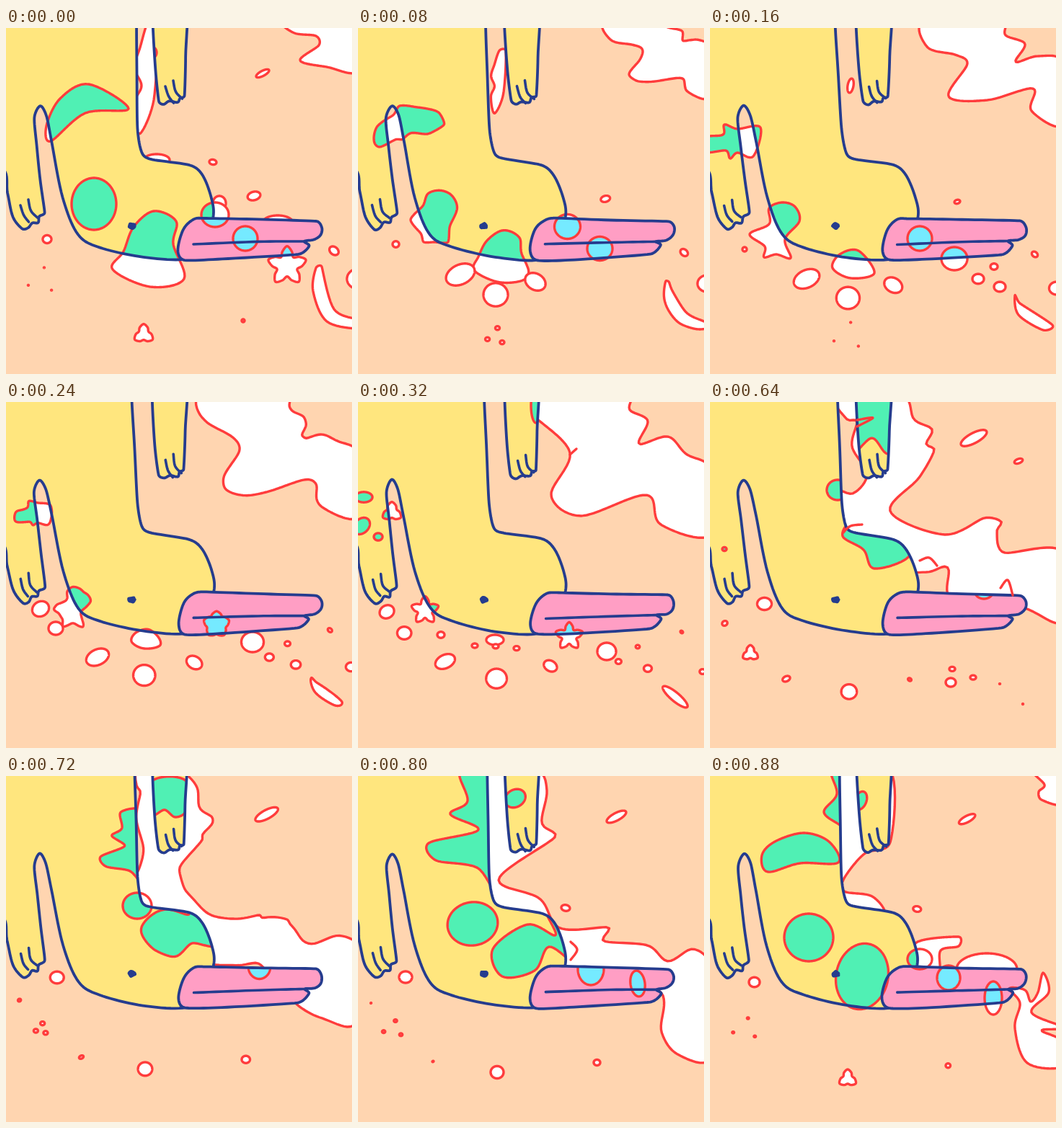
Animation, 480 px wide and 480 px high, one loop 960 ms. Source, as an HTML page with a canvas:

```html
<!DOCTYPE html>
<html lang="en">
<head>
<meta charset="utf-8">
<title>Splash</title>
<style>
html, body { margin: 0; width: 100%; height: 100%; overflow: hidden; background: #ffd5b0; }
canvas { display: block; width: 480px; height: 480px; }
</style>
</head>
<body>
<canvas id="stage" width="480" height="480"></canvas>
<script>
const ctx = document.getElementById('stage').getContext('2d');
const STEPS = 12, STEP_MS = 80, SAMPLES = 300, TURN = 2 * Math.PI;
const C = { sand: '#ffd5b0', skin: '#ffe67e', bill: '#ff9ec4', wet: '#50f0b4', wetBill: '#75eaff', ink: '#253c8e', red: '#ff3c3c' };

const pairs = a => Array.from({ length: a.length / 2 }, (_, i) => [a[2 * i], a[2 * i + 1]]);
const gap = (a, b) => Math.hypot(a[0] - b[0], a[1] - b[1]);
const mix = (a, b, f) => a + (b - a) * f;

// ---- Shapes: every one returns a list of points ----
const shape = (...a) => pairs(a);

function oval(x, y, rx, ry = rx, deg = 0) {
  const r = deg * TURN / 360, cos = Math.cos(r), sin = Math.sin(r);
  return Array.from({ length: 14 }, (_, i) => {
    const u = rx * Math.cos(i * TURN / 14), v = ry * Math.sin(i * TURN / 14);
    return [x + u * cos - v * sin, y + u * sin + v * cos];
  });
}

// Splat with n arms, the first one pointing up
function star(x, y, r, n, depth = .3) {
  return Array.from({ length: n * 4 }, (_, i) => {
    const a = i * TURN / (n * 4), d = r * (1 + depth * Math.cos(n * a));
    return [x + d * Math.sin(a), y - d * Math.cos(a)];
  });
}

// ---- Tracks: poses by step; steps past 11 carry on into the next round ----

// Flying drop: drag slows it sideways while it falls evenly and shrinks
function drop(t0, t1, [x0, y0, r0], [x1, y1, r1], flat = .85, tilt = 0) {
  const track = {};
  for (let t = t0; t <= t1; t++) {
    const f = (t - t0) / (t1 - t0), r = mix(r0, r1, f);
    track[t] = oval(mix(x0, x1, 1 - (1 - f) ** 2), mix(y0, y1, f), r, r * flat, tilt);
  }
  return track;
}

// A splat breaks into three specks that drift apart
function burst(t0, t1, x, y, r0, r1) {
  return [0, 1, 2].map(k => {
    const a = (.45 + k / 3) * TURN, at = (r, size) => [x + r * Math.cos(a), y + r * Math.sin(a), size];
    return drop(t0, t1, at(r0, 3), at(r1, .5));
  });
}

// Fine spray travelling along under the bill
const spray = Array.from({ length: 8 }, (_, i) =>
  ({ [4 + 2 * Math.floor(i / 3)]: oval(162 + i * 29, 338 + i * i * .9, 4, 3) }));

// Liquid behind the bird
const wave = {
  11: shape(448,-8, 464,12, 456,22, 460,33, 490,38, 490,-8),
  12: shape(385,-8, 400,7, 430,11, 434,24, 408,45, 445,54, 490,59, 490,-8),
  14: shape(296,-8, 302,27, 340,37, 357,50, 331,95, 385,100, 448,84, 446,115, 490,134, 490,48, 455,39, 424,47, 437,22, 410,10, 408,-8),
  16: shape(243,-8, 243,18, 294,70, 268,130, 310,158, 400,129, 420,170, 490,184, 490,94, 455,72, 430,48, 390,58, 402,26, 377,11, 377,-8),
  18: shape(195,-8, 230,40, 230,80, 252,88, 220,130, 218,185, 260,213, 365,186, 395,225, 490,236, 490,155, 466,130, 430,132, 390,107, 318,133, 382,36, 326,34, 338,-8),
  20: shape(176,-8, 190,24, 204,27, 197,62, 218,100, 198,127, 168,122, 220,225, 300,236, 330,230, 336,275, 430,284, 490,304, 490,208, 408,209, 398,180, 404,166, 380,161, 325,184, 250,152, 290,105, 311,67, 300,58, 308,38, 283,24, 268,-8),
  22: shape(176,-8, 172,160, 270,275, 415,296, 421,355, 445,387, 490,390, 490,265, 465,240, 430,257, 402,235, 341,229, 347,210, 280,211, 252,170, 195,143, 273,85, 255,65, 262,20, 248,-8)
};
const back = [
  wave,
  { 11: shape(178,-8, 176,160, 190,190, 241,192, 225,167, 186,160, 186,142, 214,108, 250,92, 250,-8),
    12: shape(197,-8, 186,27, 178,55, 188,80, 178,105, 185,147, 205,100, 212,-8),
    14: oval(195, 80, 4, 10, 10) },
  { 11: shape(285,232, 345,223, 345,236, 320,242, 318,270, 300,270), 12: oval(296, 243, 9, 10) },
  { 11: oval(384, 268, 42, 22), 12: oval(377, 270, 21, 10) },
  { 12: oval(209, 183, 18, 8) }
];

// Liquid only on the body and bill
const skin = [
  { 8: oval(177, 122, 15, 14),
    10: shape(142,-8, 152,35, 128,53, 167,75, 98,93, 108,117, 165,127, 196,160, 196,-8),
    11: shape(168,-8, 176,25, 158,50, 180,68, 196,80, 196,-8) },
  { 8: shape(200,165, 184,186, 213,205, 228,231, 277,213, 270,170),
    10: shape(262,188, 274,221, 235,206, 187,240, 200,278, 245,270, 265,237, 302,258, 304,215) },
  { 8: oval(380, 264, 12, 9), 10: oval(323, 268, 18, 22) }
];

// Liquid only on the right leg
const legWet = [
  { 4: oval(247, 5, 7, 24),
    6: shape(195,-8, 198,9, 237,11, 223,30, 270,35, 270,-8),
    8: shape(195,-8, 198,66, 225,50, 246,72, 270,60, 270,-8),
    10: oval(218, 31, 15, 12, -30), 11: oval(209, 34, 8, 13, 20), 12: oval(204, 34, 5, 7) }
];

// Drops that cross everything
const drops = [
  { 11: shape(72,110, 90,91, 130,79, 165,91, 178,120, 125,121, 80,133),
    12: shape(56,136, 75,98, 115,78, 170,112, 110,118, 62,157),
    14: shape(-8,152, 18,148, 20,134, 38,140, 70,138, 60,178, 38,173, 28,181, 22,170, -8,172),
    16: star(47, 153, 11, 3), 18: oval(43, 149, 4, 7) },
  { 9: oval(182, 180, 20, 18), 10: oval(159, 205, 35, 30, -10), 11: oval(137, 224, 34, 33), 12: oval(122, 244, 31, 36),
    14: shape(82,250, 100,242, 118,248, 124,268, 104,293, 112,319, 92,314, 75,318, 76,303, 55,286, 82,272),
    16: star(93, 289, 15, 5), 18: oval(85, 281, 11, 9), 22: oval(66, 279, 9, 8), 26: oval(48, 307, 3) },
  { 11: oval(211, 278, 36, 46, 12),
    12: shape(177,276, 205,254, 236,268, 232,300, 247,348, 200,359, 148,335, 163,310),
    14: shape(180,314, 206,309, 228,340, 195,347, 170,333),
    16: oval(190, 330, 12, 7), 18: oval(191, 342, 3) },
  { 11: oval(291, 254, 17, 14), 12: oval(290, 259, 19, 17), 14: oval(291, 292, 17),
    16: star(293, 325, 15, 5), 18: oval(292, 326, 7, 5) },
  { 11: oval(331, 280, 16, 17), 12: oval(332, 292, 17), 14: oval(339, 320, 18, 16), 16: oval(345, 346, 13, 12),
    18: star(347, 374, 13, 3, .1), 20: oval(334, 389, 7, 6), 24: oval(329, 406, 2) },
  { 10: oval(388, 288, 10, 18, -8), 11: oval(393, 308, 12, 23), 12: star(390, 330, 21, 5) },
  { 11: shape(415,295, 437,297, 445,313, 455,300, 462,273, 470,300, 446,328, 490,349, 460,353, 490,369, 490,403, 440,398, 423,350, 430,315),
    12: shape(430,333, 438,331, 455,390, 490,405, 490,417, 445,407, 426,365),
    14: shape(423,371, 430,382, 475,412, 462,419, 428,398), 16: oval(440, 409, 22, 6, 40), 20: oval(434, 419, .5) },
  drop(13, 22, [191, 370, 17], [193, 411, 9], .95),
  { 23: star(191, 420, 10, 3), 24: star(191, 425, 11, 3) },
  drop(13, 22, [142, 342, 21], [104, 396, 1], .65, -25),
  drop(13, 20, [246, 352, 15], [277, 385, 2.5], .75, 30),
  drop(14, 20, [402, 359, 8], [402, 391, .5]),
  drop(14, 18, [394, 331, 5], [386, 348, .5]),
  drop(14, 17, [372, 348, 8], [360, 366, 2]),
  drop(12, 16, [490, 348, 17], [478, 374, 4]),
  drop(12, 14, [344, 233, 9], [343, 241, 4], .65, -15),
  drop(12, 16, [455, 309, 7], [449, 319, 2], .75, 40),
  drop(10, 12, [288, 183, 6], [287, 186, 5], .7, 10),
  drop(8, 12, [366, 50, 20], [356, 63, 10], .35, -28),
  drop(6, 8, [430, 76, 10], [428, 82, 6], .5, -20),
  drop(4, 6, [8, 132, 12], [0, 132, 5], .6),
  drop(4, 6, [5, 172, 13], [0, 183, 5], .75, -45),
  drop(4, 8, [28, 187, 6], [20, 204, 3]),
  drop(3, 10, [48, 287, 12], [18, 315, .5], .85, -30),
  drop(3, 7, [69, 314, 10], [58, 340, 9], .9),
  { 8: star(56, 349, 9, 3) },
  drop(4, 6, [115, 323, 5], [118, 330, 3.5]),
  ...burst(9, 12, 49, 351, 8, 19),
  ...burst(13, 14, 191, 428, 12, 20),
  ...spray
];

// Loose red strokes by step
const curls = {
  4: [shape(294,73, 303,65)],
  6: [shape(262,181, 248,180, 240,187, 248,194, 260,195)],
  8: [shape(291,220, 304,216, 315,227), shape(403,258, 413,247, 420,268), shape(211,170, 195,172, 185,181), shape(204,34, 226,22, 204,25)],
  10: [shape(295,230, 304,241, 295,255)]
};

// ---- The bird ----
const body = shape(-60,-60, -60,190, -6,195, 2,228, 10,262, 23,279, 31,277, 36,270, 44,270, 46,262, 54,256, 48,210,
  43,165, 39,125, 47,108, 56,122, 64,160, 79,235, 100,286, 130,304, 190,318, 250,321, 275,300, 288,262, 285,235, 272,204,
  254,190, 203,182, 189,174, 183,140, 182,60, 181,-8, 181,-60);
const bill = shape(275,264, 350,266, 430,268, 438,276, 437,287, 428,294, 414,296, 420,302, 405,314, 300,321, 248,322, 239,308, 246,280, 260,266);
const leg = shape(203,-60, 203,-8, 207,60, 212,101, 219,106, 227,102, 238,103, 241,97, 247,94, 249,40, 249,-60);
const toes = (x, y) => [shape(x,y, x + 4,y + 14, x + 11,y + 23), shape(x + 11,y - 8, x + 14,y + 8, x + 23,y + 17)];
const billLine = [shape(260,300, 350,297, 416,296)];
const eye = oval(174.5, 274.5, 6, 5);

// ---- Geometry ----

// Cubic spline with tangents limited by the shorter neighbouring span
function smooth(pts, closed = true) {
  const n = pts.length, at = i => closed ? pts[(i + n) % n] : pts[Math.max(0, Math.min(n - 1, i))];
  const slope = i => {
    const p = at(i - 1), q = at(i), r = at(i + 1), len = gap(p, r) / 2 || 1;
    const k = Math.min(1, 1.2 * Math.min(gap(p, q) || 99, gap(q, r) || 99) / len) / 2;
    return [(r[0] - p[0]) * k, (r[1] - p[1]) * k];
  };
  const out = [];
  for (let i = 0; i < (closed ? n : n - 1); i++) {
    const a = at(i), b = at(i + 1), ma = slope(i), mb = slope(i + 1);
    for (let t = 0; t < .99; t += .1) {
      const s = t * t * (3 - 2 * t), u = t * (1 - t) ** 2, v = t * t * (t - 1);
      out.push([0, 1].map(d => mix(a[d], b[d], s) + ma[d] * u + mb[d] * v));
    }
  }
  if (!closed) out.push(pts[n - 1]);
  return out;
}

// Evenly spaced points, always in the same turning direction
function outline(shapePts) {
  let pts = smooth(shapePts);
  const n = pts.length, next = i => pts[(i + 1) % n];
  const area = pts.reduce((s, p, i) => s + p[0] * next(i)[1] - next(i)[0] * p[1], 0);
  if (area < 0) pts = pts.reverse();
  const sum = [0];
  for (let i = 0; i < n; i++) sum.push(sum[i] + gap(pts[i], next(i)));
  let k = 0;
  return Array.from({ length: SAMPLES }, (_, i) => {
    const d = sum[n] * i / SAMPLES;
    while (sum[k + 1] <= d) k++;
    const f = (d - sum[k]) / (sum[k + 1] - sum[k]), a = pts[k], b = next(k);
    return [mix(a[0], b[0], f), mix(a[1], b[1], f)];
  });
}

// Turn b's starting point so that it lies closest to a
function align(a, b) {
  let best = -Infinity, shift = 0;
  for (let k = 0; k < SAMPLES; k += 2) {
    let dot = 0;
    for (let i = 0; i < SAMPLES; i += 3) {
      const q = b[(i + k) % SAMPLES];
      dot += a[i][0] * q[0] + a[i][1] * q[1];
    }
    if (dot > best) { best = dot; shift = k; }
  }
  return b.slice(shift).concat(b.slice(0, shift));
}

function prepare(track) {
  const keys = Object.keys(track).map(Number), poses = [];
  for (const k of keys) {
    const o = outline(track[k]);
    poses.push(poses.length ? align(poses[poses.length - 1], o) : o);
  }
  return { keys, poses };
}

function poseAt({ keys, poses }, t) {
  const i = keys.findIndex(k => k >= t);
  if (i < 0 || t < keys[0]) return null;
  if (keys[i] === t) return poses[i];
  const f = (t - keys[i - 1]) / (keys[i] - keys[i - 1]);
  return poses[i].map((p, j) => p.map((v, d) => mix(poses[i - 1][j][d], v, f)));
}

function pathsAt(tracks, step) {
  const out = [];
  for (const tr of tracks)
    for (let t = step; t < 3 * STEPS; t += STEPS) {
      const pts = poseAt(tr, t);
      if (pts) out.push(toPath(pts));
    }
  return out;
}

function toPath(pts, closed = true) {
  const path = new Path2D();
  pts.forEach(p => path.lineTo(p[0], p[1]));
  if (closed) path.closePath();
  return path;
}

// Hand-drawn line: every step shifts the points a little
const boil = (pts, step) => pts.map(([x, y], i) =>
  [x + .6 * Math.sin(i * 7.3 + step * 5.1), y + .6 * Math.sin(i * 4.7 + step * 3.7)]);

// The right flank swings in quickly and eases back over the loop
function lean(pts, step) {
  const s = 7 * Math.min(1, step / 2) * Math.cos(Math.max(0, step - 2) / 10 * TURN / 4);
  return pts.map(([x, y]) => x > 170 && x < 188 && y < 165 ? [x - s * Math.min(1, 1 - y / 165), y] : [x, y]);
}

// ---- Drawing ----
const layers = [back, skin, legWet, drops].map(set => set.map(prepare));

function stroke(path, color, width) {
  ctx.strokeStyle = color;
  ctx.lineWidth = width;
  ctx.stroke(path);
}

function liquid(paths, color) {
  for (const p of paths) {
    ctx.fillStyle = color;
    ctx.fill(p);
    stroke(p, C.red, 3.4);
  }
}

const line = (pts, color, width) => stroke(toPath(smooth(pts, false), false), color, width);

function part(pts, color, wet, wetColor, lines, step) {
  const path = toPath(smooth(pts));
  ctx.fillStyle = color;
  ctx.fill(path);
  ctx.save();
  ctx.clip(path);
  liquid(wet, wetColor);
  ctx.restore();
  stroke(path, C.ink, 3.8);
  for (const l of lines) line(boil(l, step), C.ink, 3.6);
}

function draw(step) {
  const [behind, onSkin, onLeg, over] = layers.map(l => pathsAt(l, step));
  ctx.fillStyle = C.sand;
  ctx.fillRect(0, 0, 480, 480);
  ctx.lineCap = ctx.lineJoin = 'round';
  liquid(behind, '#fff');
  liquid(over, '#fff');
  part(lean(boil(body, step), step), C.skin, [...onSkin, ...over], C.wet, toes(20, 246), step);
  ctx.fillStyle = C.ink;
  ctx.fill(toPath(smooth(boil(eye, step))));
  part(boil(bill, step), C.bill, [...onSkin, ...over], C.wetBill, billLine, step);
  part(boil(leg, step), C.skin, [...onLeg, ...over], C.wet, toes(221, 81), step);
  for (const c of curls[step] || []) line(c, C.red, 3.4);
}

let shown = -1;
function tick() {
  const step = Math.floor(performance.now() / STEP_MS) % STEPS;
  if (step !== shown) draw(shown = step);
  requestAnimationFrame(tick);
}
tick();
</script>
</body>
</html>
```
